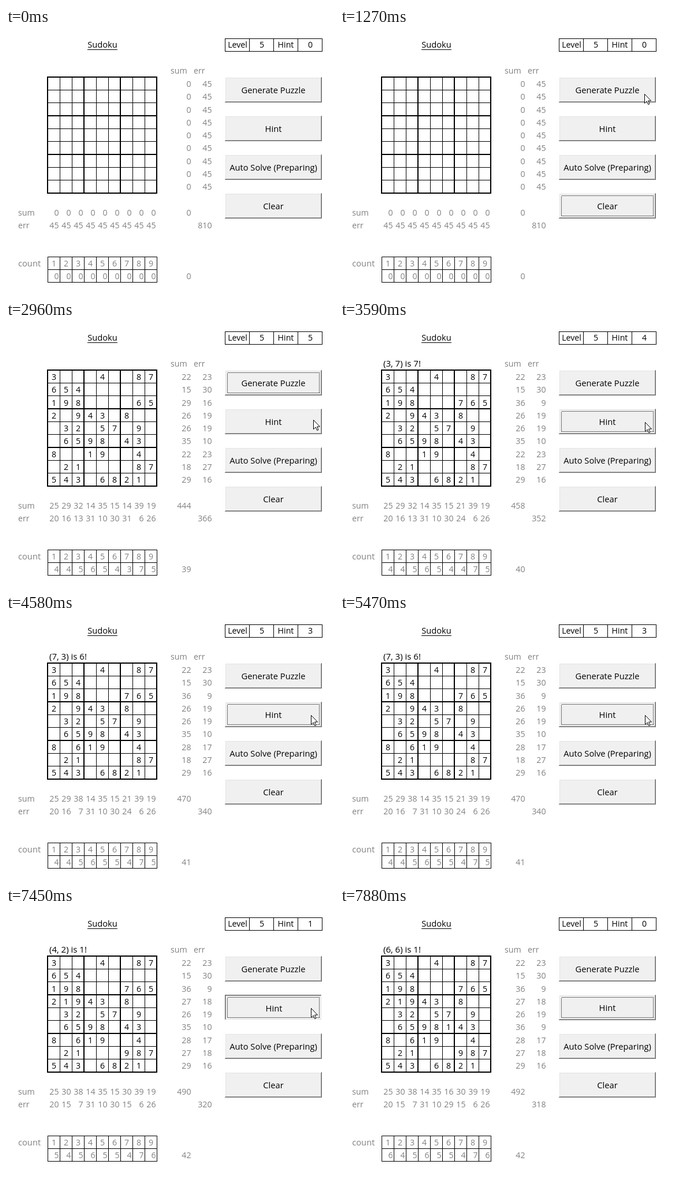
Write an HTML page that moves like this. It is 568 px wide and 459 px high and loops after 8870 ms.

```html
<!DOCTYPE html>
<html lang="en">
<head>
<meta charset="utf-8">
<title>Sudoku</title>
<style>
  html, body { margin: 0; width: 100%; height: 100%; overflow: hidden; background: #fff; }
  svg { display: block; width: 568px; height: 459px; }
  text { font: 14.7px "Open Sans", "Noto Sans", sans-serif; white-space: pre; }
  .num { font-size: 14.2px; }
  .small { font-size: 14.2px; }
  .message { font-size: 15px; }
  .gray { fill: #808080; }
  .mid { text-anchor: middle; }
  .end { text-anchor: end; }
  rect, .dots { shape-rendering: crispEdges; }
  .dots { fill: none; stroke: #000; stroke-dasharray: 1 1; }
</style>
</head>
<body>
<svg id="stage" viewBox="0 0 568 459"></svg>
<script>
const LOOP = 8870;
const PUZZLE = "3...4..87" + "654......" + "198....65" + "2.943.8.." + ".32.57.9." +
               ".6598.43." + "8..19..4." + ".21....87" + "543.6821.";
const HINTS = [[3, 7, 7], [7, 3, 6], [8, 7, 9], [4, 2, 1], [6, 6, 1]];
const LABELS = ["Generate Puzzle", "Hint", "Auto Solve (Preparing)", "Clear"];
const [GENERATE, HINT, , CLEAR] = LABELS.keys();

// Each step changes part of the state at the given time.
const STEPS = [
  [0, { cursor: null, focus: -1, pressed: -1, filled: false, hints: 0 }],
  [290, { cursor: [482, 455] }],
  [390, { cursor: null }],
  [590, { cursor: [540, 164] }],
  [790, { cursor: [534, 136] }],
  [880, { cursor: [528, 118] }],
  [980, { cursor: [527, 114] }],
  [1270, { focus: CLEAR }],
  [1870, { focus: GENERATE }],
  [2080, { filled: true }],
  [2670, { cursor: [528, 117] }],
  [2770, { cursor: [534, 132] }],
  [2860, { cursor: [540, 155] }],
  [2960, { cursor: [532, 171] }],
  [3060, { cursor: [528, 175] }],
  [3480, { focus: HINT }],
  [3590, { hints: 1 }],
  [4380, { pressed: HINT }],
  [4480, { pressed: -1 }],
  [4580, { hints: 2 }],
  [5370, { pressed: HINT }],
  [5470, { pressed: -1 }],
  [5560, { hints: 3 }],
  [6450, { pressed: HINT }],
  [6560, { pressed: -1, hints: 4 }],
  [7450, { pressed: HINT }],
  [7580, { pressed: -1, hints: 5 }],
  [7880, { cursor: null }],
];

const stage = document.getElementById("stage");
const NINE = [...Array(9).keys()];
const total = list => list.reduce((a, b) => a + b, 0);

function add(tag, attrs, parent = stage) {
  const node = document.createElementNS("http://www.w3.org/2000/svg", tag);
  for (const key in attrs) node.setAttribute(key, attrs[key]);
  return parent.appendChild(node);
}
function label(x, y, cls, content = "", parent = stage) {
  const node = add("text", { x, y, class: cls }, parent);
  node.textContent = content;
  return node;
}
function box(x, y, width, height, fill = "#000", parent = stage) {
  return add("rect", { x, y, width, height, fill }, parent);
}

const colX = i => 72 + 21 * i;
const lineY = i => Math.floor(85 + 22.34 * i);
const rowY = i => Math.round(102 + 22.25 * i);
const digitRow = (y, dx, cls) => NINE.map(i => label(colX(i) + dx, y, cls));

label(167, 34, "mid", "Sudoku");
box(141, 37, 52, 1);

// Level and hint table
for (let i = 0; i < 5; i++) box(379 + 42 * i, 18, 1, 23);
box(379, 18, 169, 1);
box(379, 40, 169, 1);
label(401, 34, "small mid", "Level");
label(443, 34, "num mid", "5");
label(484.5, 34, "small mid", "Hint");
const hintsLeft = label(527, 34, "num mid");

// Sudoku grid
for (let i = 0; i <= 9; i++) {
  const bold = i % 3 ? 0 : 1;
  box(colX(i) - bold, 84, 1 + bold, 203);
  box(71, lineY(i) - bold, 191, 1 + bold);
}
const cells = NINE.flatMap(r => digitRow(rowY(r), 11, "num mid"));
const message = label(75, 79, "message");

// Sums and errors
label(285, 79, "gray small", "sum");
label(325, 79, "gray small", "err");
label(21, 325, "gray small", "sum");
label(21, 347, "gray small", "err");
const rowSums = NINE.map(r => label(320.5, rowY(r), "num gray end"));
const rowErrs = NINE.map(r => label(356.5, rowY(r), "num gray end"));
const colSums = digitRow(325, 19.5, "num gray end");
const colErrs = digitRow(347, 19.5, "num gray end");
const sumTotal = label(320.5, 325, "num gray end");
const errTotal = label(356.5, 347, "num gray end");

// Digit counts
label(21, 413, "gray", "count");
for (let i = 0; i <= 9; i++) box(colX(i), 396, 1, 45);
for (const y of [396, 418, 440]) box(72, y, 190, 1);
digitRow(413, 11, "num gray mid").forEach((node, i) => node.textContent = i + 1);
const counts = digitRow(435, 19.5, "num gray end");
const countTotal = label(320.5, 435, "num gray end");

function bevel(parent, width, height, outerTop, innerTop, innerBottom, outerBottom) {
  box(0, 0, width, height, outerBottom, parent);
  box(0, 0, width - 1, height - 1, outerTop, parent);
  box(1, 1, width - 2, height - 2, innerBottom, parent);
  box(1, 1, width - 3, height - 3, innerTop, parent);
  box(2, 2, width - 4, height - 4, "#f0f0f0", parent);
}
const buttons = LABELS.map((name, i) => {
  const root = add("g", { transform: `translate(379 ${85 + 67 * i})` });
  const up = add("g", {}, root);
  const down = add("g", {}, root);
  bevel(up, 168, 44, "#fff", "#e3e3e3", "#a0a0a0", "#696969");
  bevel(down, 168, 44, "#696969", "#a0a0a0", "#e3e3e3", "#fff");
  const text = label(84, 27.5, "mid", name, root);
  const focus = add("rect", { x: 4.5, y: 4.5, width: 159, height: 35, class: "dots" }, root);
  return { up, down, text, focus };
});

const cursor = add("path", {
  d: "M.5 .5V16.5L4.2 13L6.8 18.5L9 17.5L6.6 12H11.5Z", fill: "#fff", stroke: "#000"
});

const show = (node, on) => node.setAttribute("display", on ? "inline" : "none");
const write = (nodes, values) => nodes.forEach((node, i) => node.textContent = values[i]);

function draw(state) {
  const grid = [...PUZZLE].map(c => state.filled ? +c || 0 : 0);
  const used = HINTS.slice(0, state.hints);
  for (const [r, c, v] of used) grid[r * 9 + c - 10] = v;

  const rows = NINE.map(r => total(grid.slice(r * 9, r * 9 + 9)));
  const cols = NINE.map(c => total(NINE.map(r => grid[r * 9 + c])));
  const tally = NINE.map(d => grid.filter(v => v === d + 1).length);
  const sum = total(rows) + total(cols);

  write(cells, grid.map(v => v || ""));
  write(rowSums, rows);
  write(rowErrs, rows.map(v => 45 - v));
  write(colSums, cols);
  write(colErrs, cols.map(v => 45 - v));
  write(counts, tally);
  sumTotal.textContent = sum;
  errTotal.textContent = 810 - sum;
  countTotal.textContent = total(tally.slice(1));
  hintsLeft.textContent = state.filled ? 5 - state.hints : 0;

  const last = used[used.length - 1];
  message.textContent = last ? `(${last[0]}, ${last[1]}) is ${last[2]}!` : "";

  buttons.forEach(({ up, down, text, focus }, i) => {
    const pressed = state.pressed === i;
    show(up, !pressed);
    show(down, pressed);
    show(focus, state.focus === i);
    text.setAttribute("transform", pressed ? "translate(1 1)" : "");
  });
  show(cursor, state.cursor);
  if (state.cursor) cursor.setAttribute("transform", `translate(${state.cursor})`);
}

let shown = 0;
function tick() {
  const time = performance.now() % LOOP;
  const past = STEPS.filter(([start]) => start <= time);
  if (past.length !== shown) {
    shown = past.length;
    draw(Object.assign({}, ...past.map(step => step[1])));
  }
  requestAnimationFrame(tick);
}
tick();
</script>
</body>
</html>
```
